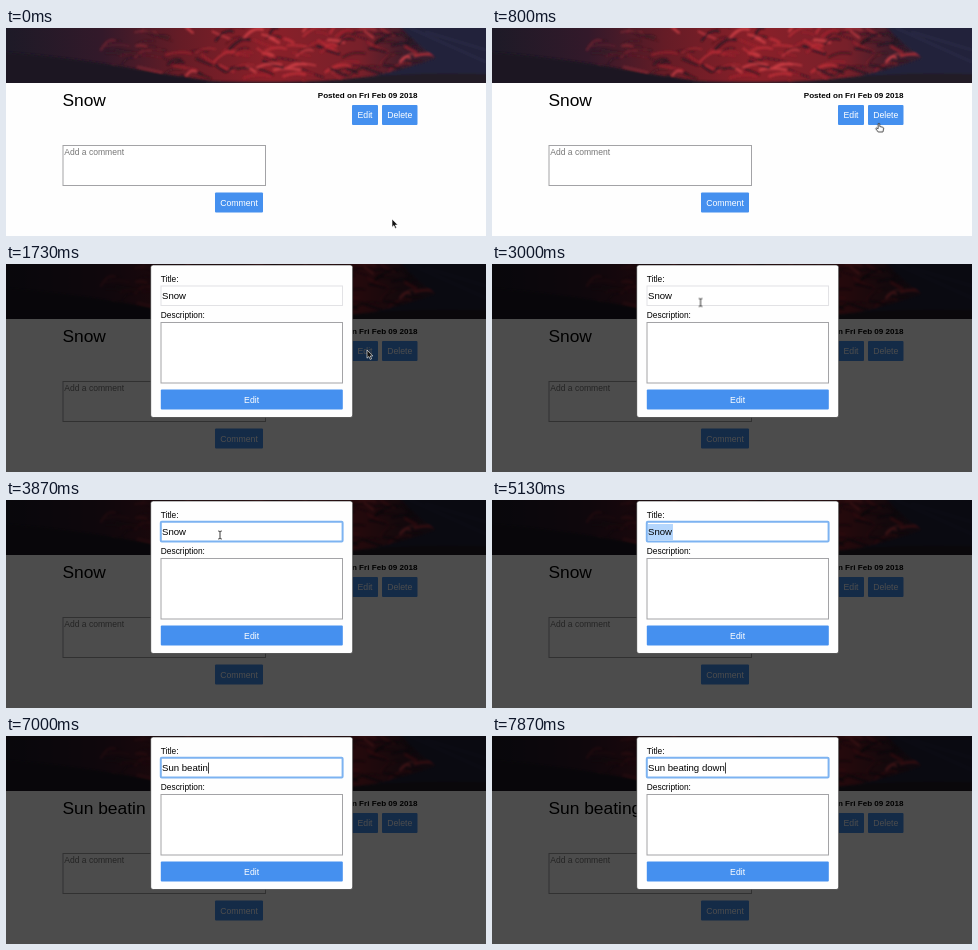
An HTML page for the animation above (8 s loop, 480 by 208 pixels).

```html
<!DOCTYPE html>
<html lang="en">
<head>
<meta charset="utf-8">
<title>Edit post</title>
<style>
html, body { margin: 0; width: 100%; height: 100%; overflow: hidden; background: #fefefe; }
svg { display: block; width: 480px; height: 208px; font: 8.7px "Liberation Sans", Arial, sans-serif; }
text { white-space: pre; }
.title { font-size: 17.4px; }
.date { font-size: 8.1px; font-weight: bold; }
.label { font-size: 8.35px; }
.field { font-size: 9.6px; }
.btn rect { fill: #4590ef; }
.btn text { fill: #fff; text-anchor: middle; }
.box { fill: #fff; stroke: #a3a3a6; }
.hint { fill: #777; font-size: 8.55px; }

#press, #modal, #focus, #caret, #select, #arrow, #hand, #beam, #pointer {
  animation: 8s step-end infinite;
}
#press { animation-name: press; }
#modal { animation-name: modal; }
#focus { animation-name: focus; }
#caret { animation-name: caret; }
#select { animation-name: select; }
#arrow { animation-name: arrow; }
#hand { animation-name: hand; }
#beam { animation-name: beam; }
#pointer { animation-name: move; animation-timing-function: linear; }

@keyframes press { 0%, 21.6% { opacity: 0 } 19.95% { opacity: 1 } }
@keyframes modal { 0% { opacity: 0 } 21.6%, 100% { opacity: 1 } }
@keyframes focus { 0% { opacity: 0 } 41.6%, 100% { opacity: 1 } }
@keyframes caret {
  0%, 47.5%, 60% { opacity: 0 }
  41.6%, 53.7%, 69.1%, 100% { opacity: 1 }
}
@keyframes select { 0%, 69.1% { opacity: 0 } 64.1% { opacity: 1 } }
@keyframes arrow {
  0%, 21.6%, 34.2% { opacity: 1 }
  10%, 28%, 36.6%, 100% { opacity: 0 }
}
@keyframes hand { 0%, 21.6% { opacity: 0 } 10% { opacity: 1 } }
@keyframes beam {
  0%, 34.2%, 52.5%, 100% { opacity: 0 }
  28%, 36.6% { opacity: 1 }
}
@keyframes move {
  0%, .85% { transform: translate(386px, 191px) }
  2.5% { transform: translate(389px, 180px) }
  5.4% { transform: translate(395px, 150px) }
  8.1% { transform: translate(393px, 112px) }
  10.9%, 12.2% { transform: translate(384px, 87px) }
  16.6%, 25.3% { transform: translate(361px, 86px) }
  28% { transform: translate(335px, 103px) }
  31% { transform: translate(270px, 94px) }
  33.5% { transform: translate(215px, 66px) }
  35.9% { transform: translate(192px, 49px) }
  37.5% { transform: translate(208.5px, 38.5px) }
  41.6%, 100% { transform: translate(214px, 35px) }
}
</style>
</head>
<body>
<svg viewBox="0 0 480 208">
  <defs>
    <linearGradient id="dusk">
      <stop offset="0" stop-color="#1d1a27"/>
      <stop offset=".2" stop-color="#33192a"/>
      <stop offset=".36" stop-color="#651c26"/>
      <stop offset=".55" stop-color="#8a2029"/>
      <stop offset=".74" stop-color="#77202a"/>
      <stop offset=".84" stop-color="#3a1d2b"/>
      <stop offset="1" stop-color="#20233a"/>
    </linearGradient>
    <filter id="soft"><feGaussianBlur stdDeviation=".8"/></filter>
    <clipPath id="banner"><rect width="480" height="55"/></clipPath>
  </defs>

  <g clip-path="url(#banner)">
    <rect width="480" height="55" fill="url(#dusk)"/>
    <g filter="url(#soft)">
      <g id="streaks" fill="none" stroke-linecap="round"></g>
      <path d="M-4 58V24Q70 30 130 41T250 58Z" fill="#1c1822"/>
      <path d="M392-4Q412 18 430 30Q400 42 340 54L345 60H484V-4Z" fill="#20233a"/>
      <path d="M200 53Q300 56 350 50T484 46V60H200Z" fill="#231b28"/>
      <path d="M420 4L480 22M404 0L480 34" stroke="#2c2c46" stroke-width="2"/>
    </g>
  </g>

  <text class="title" id="heading" x="56.4" y="78"></text>
  <text class="date" x="411.6" y="70.3" text-anchor="end">Posted on Fri Feb 09 2018</text>
  <g class="btn">
    <rect x="346" y="77" width="26" height="20" rx="1"/>
    <text x="359" y="90">Edit</text>
    <rect x="376" y="77" width="35.5" height="20" rx="1"/>
    <text x="393.7" y="90">Delete</text>
    <rect x="209" y="164.5" width="48" height="20" rx="1"/>
    <text x="233" y="177.6">Comment</text>
  </g>
  <rect class="box" x="57" y="117.5" width="202.5" height="40"/>
  <text class="hint" x="58.2" y="126.7">Add a comment</text>

  <g id="press">
    <rect x="346" y="77" width="26" height="20" fill="#fff" opacity=".14"/>
    <rect x="345.3" y="76.3" width="27.4" height="21.4" rx="1.5" fill="none" stroke="#9cc6f6" stroke-width="2"/>
  </g>

  <g id="modal">
    <rect width="480" height="208" opacity=".7"/>
    <rect x="144.7" y="1" width="202" height="152.5" rx="2.5" fill="#fefefe" stroke="#222" stroke-width=".6"/>
    <text class="label" x="154.8" y="18.4">Title:</text>
    <rect x="155" y="22" width="181.5" height="19.5" fill="#fff" stroke="#e2e2e5"/>
    <rect id="focus" x="154.8" y="21.8" width="181.8" height="19.8" rx="1" fill="#fff" stroke="#7db3f1" stroke-width="2"/>
    <rect id="select" x="156" y="24" width="25" height="16" fill="#b4d6fd"/>
    <text class="field" id="value" x="156" y="35.3"></text>
    <rect id="caret" y="26.5" width=".8" height="11" fill="#111"/>
    <text class="label" x="154.8" y="54.2">Description:</text>
    <rect class="box" x="155" y="58.5" width="181.5" height="60.5"/>
    <g class="btn">
      <rect x="154.8" y="125.5" width="182" height="20" rx="1"/>
      <text x="245.6" y="138.6">Edit</text>
    </g>
  </g>

  <g id="pointer">
    <path id="arrow" d="M0 0V8.2L1.9 6.5L3.2 9.4L4.6 8.8L3.3 6H5.8Z" fill="#111" stroke="#fff" stroke-width=".6"/>
    <path id="hand" d="M-.8 .8Q0-.5 .8 .8V3.5L4 4.3Q5 4.7 4.7 6L4 9H-.8L-3.2 5.6Q-3 4.3-.8 5.8Z" fill="#fff" stroke="#222" stroke-width=".8"/>
    <path id="beam" d="M-1.8-4Q0-4 0-3Q0-4 1.8-4M0-3V3M-1.8 4Q0 4 0 3Q0 4 1.8 4" fill="none" stroke="#222" stroke-width=".9"/>
  </g>
</svg>
<script>
const LOOP = 8000;
const OLD = "Snow", NEW = "Sun beating down";
const keyTimes = [5530, 5800, 5930, 6070, 6200, 6530, 6670, 6730,
  6870, 6930, 7070, 7200, 7330, 7470, 7600, 7870];
const $ = id => document.getElementById(id);
const heading = $("heading"), value = $("value"), caret = $("caret");

let seed = 11;
const rand = (lo, hi) => {
  seed = (seed * 16807) % 2147483647;
  return lo + (hi - lo) * seed / 2147483647;
};

// Leaf-like red and dark strokes, densest right of the middle.
function drawStreaks(count) {
  const tones = ["#c5303a", "#a3232d", "#211520", "#30161f", "#d8434a", "#1c1621"];
  for (let i = 0; i < count; i++) {
    const x = rand(95, 425), y = rand(-4, 54);
    const dx = rand(8, 26), dy = rand(-10, 9);
    const line = document.createElementNS("http://www.w3.org/2000/svg", "path");
    line.setAttribute("d", `M${x} ${y}q${dx / 2} ${dy - 3} ${dx} ${dy}`);
    line.setAttribute("stroke", tones[i % tones.length]);
    line.setAttribute("stroke-width", rand(.8, 3));
    line.setAttribute("opacity", x < 160 ? .3 : .75);
    $("streaks").append(line);
  }
}

let shown;
function setText(text) {
  if (text === shown) return;
  shown = text;
  heading.textContent = value.textContent = text;
  caret.setAttribute("x", 156.2 + value.getComputedTextLength());
}

let start;
function tick(now) {
  start ??= now;
  const t = (now - start) % LOOP;
  const typed = keyTimes.filter(k => t >= k - 4).length;
  setText(typed ? NEW.slice(0, typed) : OLD);
  requestAnimationFrame(tick);
}

drawStreaks(150);
setText(OLD);
requestAnimationFrame(tick);
</script>
</body>
</html>
```
